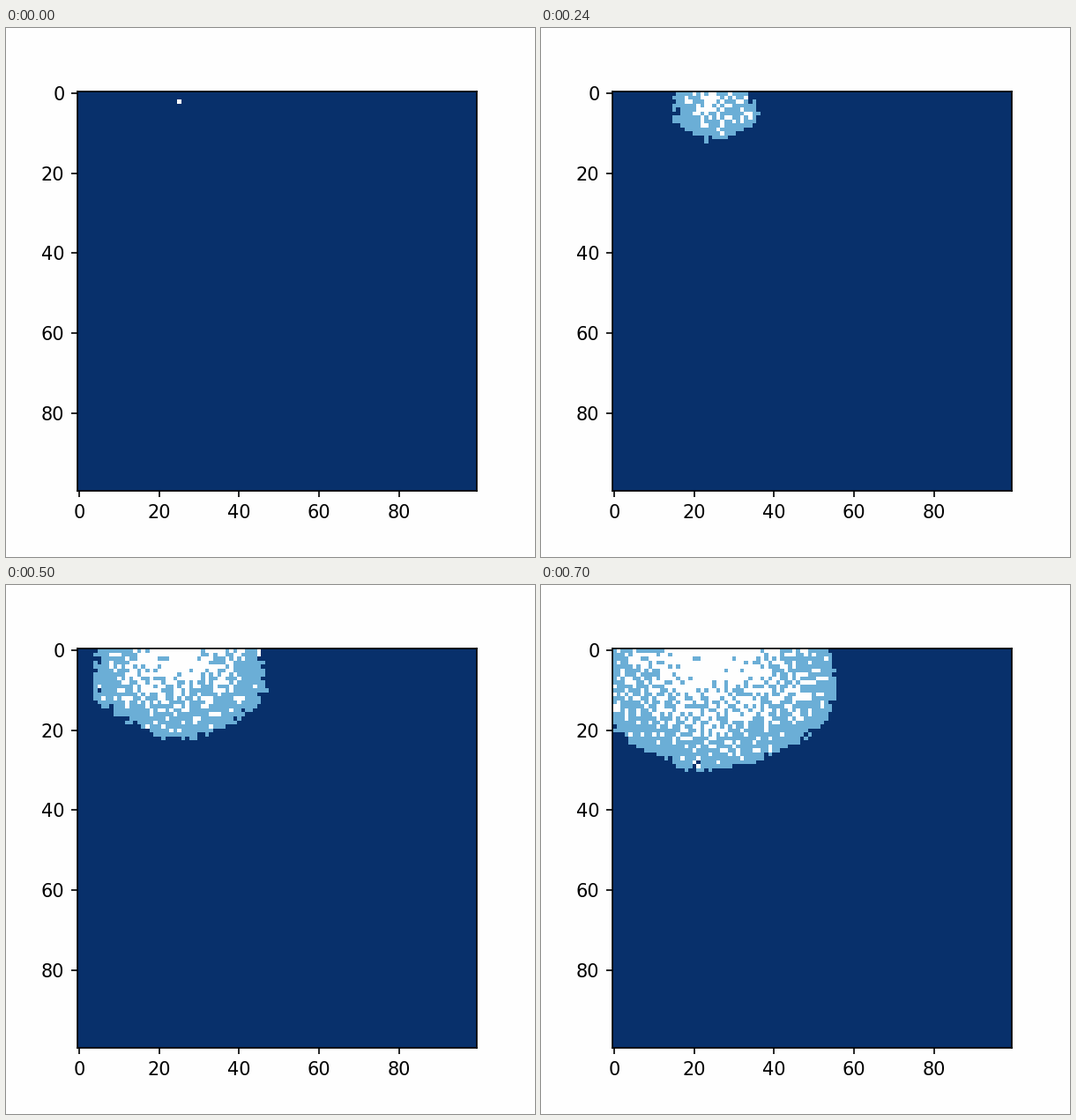
A matplotlib script for the animation above (0.72 s loop, 600 by 600 pixels).

```python
import numpy as np
import matplotlib.pyplot as plt
from matplotlib.animation import FuncAnimation
from matplotlib.colors import ListedColormap

SIZE = 100
STEPS = 36
START_X, START_Y = 25, 2
SUSCEPTIBLE, INFECTED, RECOVERED = 0, 1, 2
PAPER = "#fefefe"
COLORS = ListedColormap(["#08306b", "#6baed6", PAPER])


def near_sick(grid):
    """True where a cell or one of its eight neighbours has been infected."""
    sick = np.pad(grid > SUSCEPTIBLE, 1)
    near = np.zeros(grid.shape, bool)
    for dy in range(3):
        for dx in range(3):
            near |= sick[dy:dy + SIZE, dx:dx + SIZE]
    return near


def front_speed(dx, dy):
    """Cells per step; fastest slightly below the horizontal on both sides."""
    from_down = np.abs(np.degrees(np.arctan2(dx, dy)))
    return 0.8 + 0.12 * np.exp(-((from_down - 67) / 20) ** 2)


def simulate():
    rng = np.random.default_rng(7)
    y, x = np.mgrid[:SIZE, :SIZE]
    dx, dy = x - START_X, y - START_Y

    arrival = np.hypot(dx, dy) / front_speed(dx, dy)
    arrival += rng.normal(0, 0.9, arrival.shape)

    # Recovery is quicker around the first case.
    rate = 0.05 + 0.07 * np.exp(-((x - 23) ** 2 + (y - 2) ** 2) / 50)

    grid = np.zeros((SIZE, SIZE), int)
    grid[START_Y, START_X] = RECOVERED
    history = [grid]
    for step in range(1, STEPS):
        prev, grid = grid, grid.copy()
        caught = (prev == SUSCEPTIBLE) & near_sick(prev) & (arrival <= step)
        healed = (prev == INFECTED) & (rng.random(grid.shape) < rate)
        grid[caught] = INFECTED
        grid[healed] = RECOVERED
        history.append(grid)
    return history


history = simulate()

fig = plt.figure(figsize=(4, 4), dpi=150, facecolor=PAPER)
ax = fig.add_axes([0.135, 0.125, 0.755, 0.755])
image = ax.imshow(history[0], cmap=COLORS, vmin=SUSCEPTIBLE,
                  vmax=RECOVERED, interpolation="nearest")
ax.set_xticks(range(0, SIZE, 20))
ax.set_yticks(range(0, SIZE, 20))


def update(step):
    image.set_data(history[step])
    return [image]


anim = FuncAnimation(fig, update, frames=STEPS, interval=20,
                     repeat=True, repeat_delay=0)
plt.show()
```
